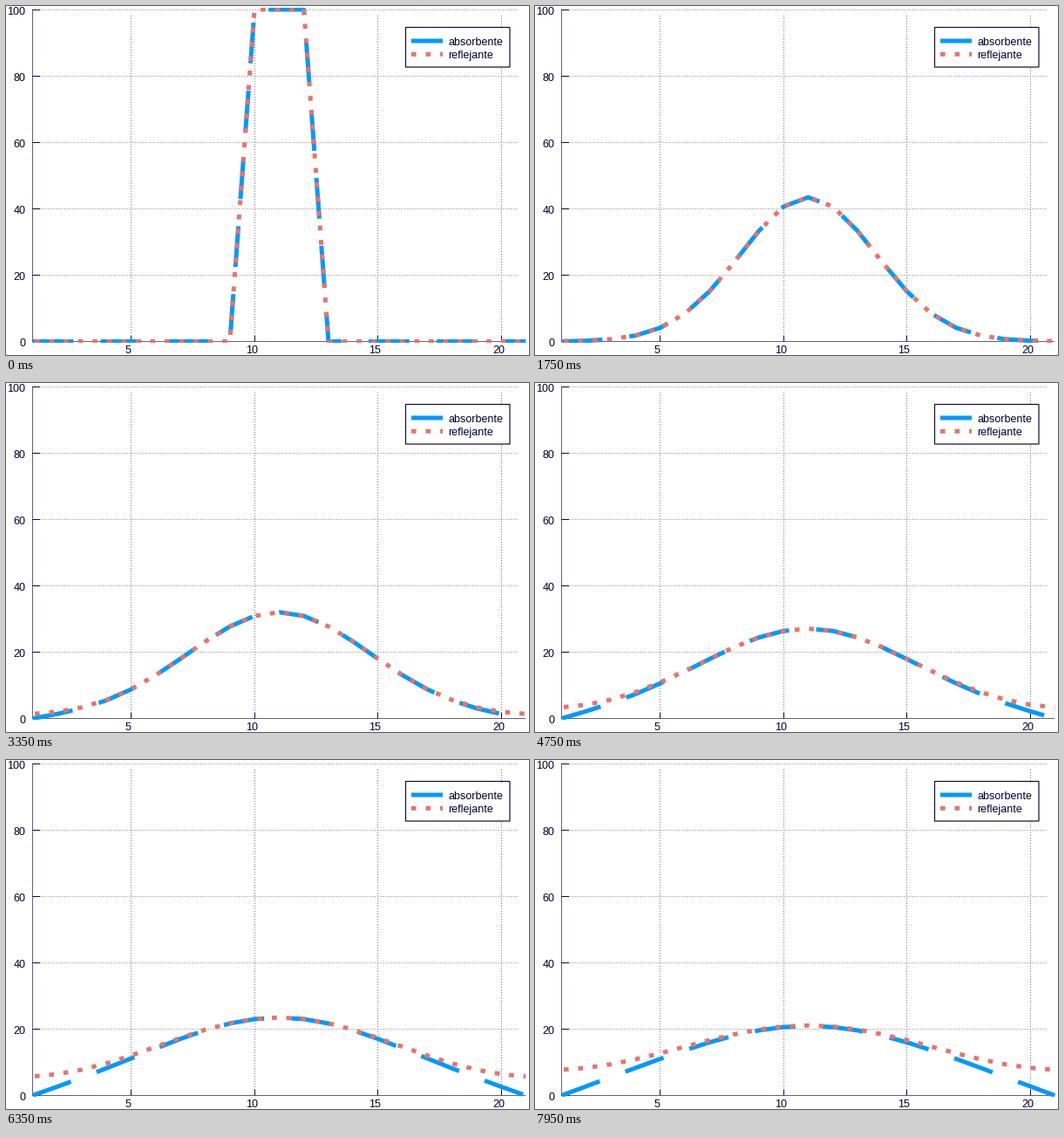
A matplotlib script that plays this animation: 600 by 400 pixels, repeating every 8 s.

```python
import numpy as np
import matplotlib.pyplot as plt
from matplotlib.animation import FuncAnimation
from matplotlib.patches import Rectangle

W, H, DPI = 600, 400, 100
PX = 72 / DPI                      # one pixel in points
FRAMES, INTERVAL = 160, 50
CELLS, RATE = 21, 0.1
BLUE, SALMON = "#0099ff", "#e8746a"
INK, AXIS, GRID = "#00002a", "#14093c", "#7f7f88"
THICK = 5

plt.rcParams["font.family"] = "Liberation Sans"
plt.rcParams["path.simplify"] = False


def px(x):
    return 30.5 + 28.29 * (x - 1)


def py(y):
    return 384.5 - 3.805 * y


def mid(v):
    """Centre of the pixel that holds v, for crisp thin lines."""
    return np.floor(v) + 0.5


def diffuse(absorbing):
    """Concentration per cell for every step of the explicit scheme."""
    u = np.zeros(CELLS)
    u[9:12] = 100
    rows = [u]
    for _ in range(FRAMES - 1):
        padded = np.pad(u, 1, mode="edge")
        u = u + RATE * (padded[2:] - 2 * u + padded[:-2])
        if absorbing:
            u[0] = u[-1] = 0
        rows.append(u)
    return rows


fig = plt.figure(figsize=(W / DPI, H / DPI), dpi=DPI, facecolor="white")
ax = fig.add_axes([0, 0, 1, 1])
ax.set_xlim(0, W)
ax.set_ylim(H, 0)
ax.axis("off")


def segment(x0, y0, x1, y1, color, width=1, **kw):
    ax.plot([x0, x1], [y0, y1], color=color, lw=width * PX, snap=False,
            solid_capstyle="butt", **kw)


def label(x, y, text, ha):
    ax.text(x, y, text, color=INK, size=12.5 * PX, ha=ha,
            va="center_baseline", zorder=6)


def dashes(on, off, shift=0):
    return (-shift / THICK, (on / THICK, off / THICK))


DASH = dashes(46.8, 31.2)
DOT, DOT_CURVE = dashes(5.6, 10.95), dashes(5.6, 10.95, 2.5)

# grid, ticks and tick labels
for v in range(0, 101, 20):
    y = mid(py(v))
    if v:
        segment(30.5, y, 587, y, GRID, ls=(0, (1, 2)), zorder=1)
    segment(30.5, y, 39, y, AXIS, zorder=2)
    label(22.3, y + 0.5, str(v), "right")
for v in range(5, 21, 5):
    x = mid(px(v))
    segment(x, 384, x, 10, GRID, ls=(0, (1, 2)), zorder=1)
    segment(x, 384.5, x, 378, AXIS, zorder=2)
    label(x - 3.3, 393, str(v), "center")
segment(30.5, 4, 30.5, 385, AXIS, 0.65, zorder=2)
segment(30.5, 384.5, 596, 384.5, AXIS, 0.65, zorder=2)

# curves
clip = Rectangle((30, 2), 567, 384, transform=ax.transData)
xs = px(np.arange(1, CELLS + 1))
curves = []
for absorbing, color, style in ((True, BLUE, DASH), (False, SALMON, DOT_CURVE)):
    line, = ax.plot(xs, xs, color=color, lw=THICK * PX, ls=style,
                    snap=False, zorder=3)
    line.set_clip_path(clip)
    curves.append((line, diffuse(absorbing)))

# legend
ax.add_patch(Rectangle((458.5, 24.5), 119.5, 45.5, fc="white", ec=AXIS,
                       lw=1.2 * PX, snap=False, zorder=4))
for y, text, color, style in ((40, "absorbente", BLUE, DASH),
                              (55.3, "reflejante", SALMON, DOT)):
    segment(465, y, 501, y, color, THICK, ls=style, zorder=5)
    label(507, y + 0.5, text, "left")


def update(i):
    for line, rows in curves:
        line.set_ydata(py(rows[i]))
    return [line for line, _ in curves]


anim = FuncAnimation(fig, update, frames=FRAMES, interval=INTERVAL,
                     init_func=lambda: update(0), repeat=True, repeat_delay=0)
plt.show()
```
